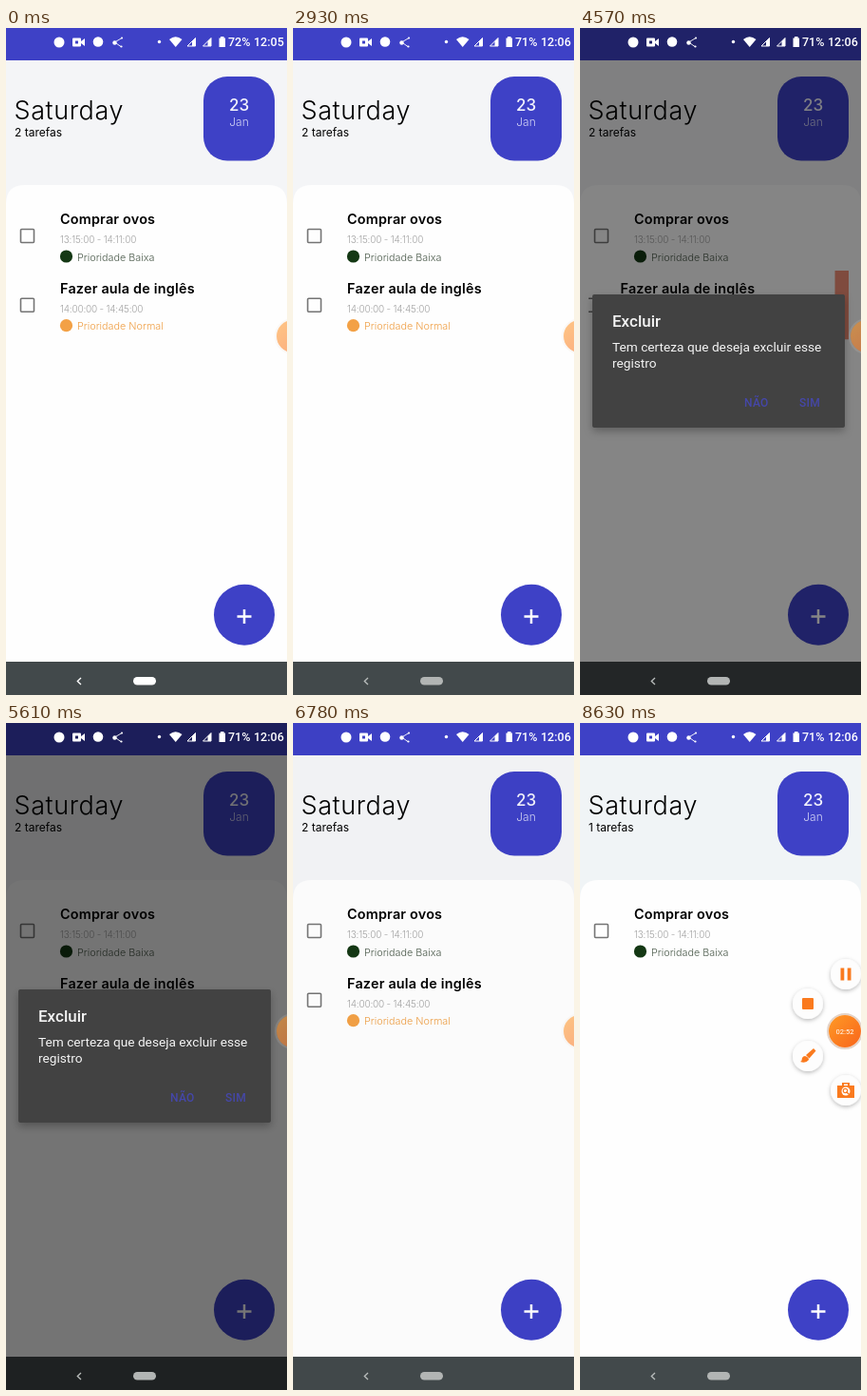
An HTML page for the animation above (8.78 s loop, 296x701 px).

```html
<!DOCTYPE html>
<html lang="pt">
<head>
<meta charset="utf-8">
<title>Tarefas</title>
<style>
  html, body { margin: 0; width: 100%; height: 100%; overflow: hidden; background: #fff; }
  svg { display: block; width: 100vw; height: 100vh; }
  text { font-family: Inter, "Open Sans", sans-serif; }
  .sys text, text.sys { font-family: Roboto, sans-serif; font-weight: 500; }
  .day { font-size: 27px; font-weight: 300; letter-spacing: .6px; }
  .title { font-size: 14.4px; font-weight: 600; letter-spacing: .2px; }
  .hours { font-size: 10px; font-weight: 300; fill: #a2a2a2; letter-spacing: -.2px; }
  .priority { font-size: 10.8px; font-weight: 300; }
  .mid { text-anchor: middle; }
  .menu path, .menu rect { fill: #fa7a1e; }
</style>
</head>
<body>
<svg viewBox="0 0 296 701" preserveAspectRatio="none">
  <defs>
    <clipPath id="rowClip"><rect x="9" y="255" width="274" height="72.5"/></clipPath>
    <filter id="soft" x="-30%" y="-30%" width="160%" height="170%">
      <feDropShadow dx="0" dy="1.5" stdDeviation="2" flood-opacity=".28"/>
    </filter>
    <filter id="lift" x="-10%" y="-10%" width="120%" height="130%">
      <feDropShadow dx="0" dy="4" stdDeviation="4.5" flood-opacity=".27"/>
    </filter>
    <linearGradient id="amber" x2="1" y2="1">
      <stop stop-color="#ff9a25"/><stop offset="1" stop-color="#f8651c"/>
    </linearGradient>
  </defs>

  <rect id="header" width="296" height="200" fill="#f4f5f7"/>
  <rect width="296" height="34" fill="#3e41c6"/>
  <path d="M0 667V185Q0 165 20 165H276Q296 165 296 185V667Z" fill="#fefefe"/>

  <text class="day" x="8.5" y="95.5">Saturday</text>
  <text id="count" x="9" y="113.5" font-size="12"></text>
  <rect x="208" y="51" width="75" height="88.5" rx="25" fill="#3e41c6"/>
  <text class="mid" x="245.5" y="87" font-size="17" font-weight="500" fill="#f2f2fc">23</text>
  <text class="mid" x="245.5" y="103" font-size="12" font-weight="300" fill="#d0d1f4">Jan</text>

  <g id="first"></g>
  <g id="swipe" clip-path="url(#rowClip)">
    <g id="second"></g>
    <g id="remove">
      <rect x="283" y="255" width="86" height="72.5" fill="#ee6b4a"/>
      <text class="sys mid" x="326.5" y="297.5" font-size="12" fill="#fbe3dc">EXCLUIR</text>
    </g>
  </g>

  <circle cx="251" cy="616.7" r="32" fill="#3e41c6"/>
  <path d="M243.5 618.5H258.5M251 611V626" stroke="#fff" stroke-width="2.5"/>

  <rect y="666" width="296" height="35" fill="#42494b"/>
  <rect id="dim" width="296" height="701"/>
  <path id="back" d="M79 683L75.3 686.5L79 690" fill="none" stroke-width="1.3"/>
  <rect id="home" x="134" y="682" width="24" height="8.5" rx="4.25"/>

  <g class="sys" fill="#fff">
    <circle cx="56" cy="15" r="5.5"/>
    <path d="M71 10.500H78Q79 10.500 79 11.500V14L83 11V19L79 16V18.500Q79 19.500 78 19.500H71Q70 19.500 70 18.500V11.500Q70 10.500 71 10.500ZM73 13.500V16.500H76V13.500Z" fill-rule="evenodd"/>
    <circle cx="97" cy="14.5" r="5.3"/>
    <path d="M122 10.5L114.5 15L121 19.5" fill="none" stroke="#fff" stroke-width=".9"/>
    <circle cx="114.5" cy="15.5" r="2.2"/>
    <circle cx="122" cy="10.5" r="1.1"/>
    <circle cx="121.5" cy="19.5" r="1.1"/>
    <circle cx="161.5" cy="14.5" r="1.7"/>
    <path d="M172 12Q178.5 6.500 185.5 12L178.7 20Z"/>
    <path d="M191 19L199.500 10.500V19ZM207.500 19L216 10.500V19Z" fill="none" stroke="#fff"/>
    <path d="M196 14V19H199.500V10.500ZM212.500 14V19H216V10.500Z"/>
    <path d="M224.5 10.500H226V9H229.5V10.500H231V20H224.5Z"/>
    <text id="battery" x="234" y="19" font-size="12.5"></text>
    <text id="clock" x="261" y="19" font-size="12.5"></text>
  </g>

  <g class="sys">
    <rect id="panel" x="13" y="280" width="266" height="140" rx="2" fill="#424242" filter="url(#lift)"/>
    <g id="message" fill="#f4f4f4">
      <text x="34" y="314" font-size="17">Excluir</text>
      <g font-size="13.7">
        <text x="34" y="340" style="font-weight:400">Tem certeza que deseja excluir esse</text>
        <text x="34" y="356.5" style="font-weight:400">registro</text>
      </g>
    </g>
    <g id="buttons" font-size="12" letter-spacing=".3" fill="#4547a8">
      <rect id="press" x="217" y="375" width="48" height="36.5" rx="2" fill="#6d6d6d"/>
      <text x="173" y="398">NÃO</text>
      <text x="231" y="398">SIM</text>
    </g>
  </g>

  <g id="menu" class="menu"></g>
  <g id="bubble">
    <circle r="18" fill="none" stroke="#e3d3c8" stroke-width="2" id="ring"/>
    <circle r="17" fill="url(#amber)" id="ball"/>
    <text id="timer" class="sys mid" y="2.7" font-size="7.5" fill="#ffe9d6">02:52</text>
  </g>
</svg>

<script>
const LOOP = 8780;
const $ = id => document.getElementById(id);
const set = (id, attrs) => {
  for (const key in attrs) $(id).setAttribute(key, attrs[key]);
};
const clamp = v => Math.max(0, Math.min(1, v));
const ease = v => v * v * (3 - 2 * v);
const ramp = (t, from, to) => ease(clamp((t - from) / (to - from)));
const within = (t, from, to) => t >= from && t < to;

function task(y, title, hours, priority, dot, ink) {
  return `<rect x="15.5" y="${y + 10.5}" width="14" height="14" rx="1" fill="none" stroke="#747474" stroke-width="1.6"/>
    <text class="title" x="57" y="${y + 5}">${title}</text>
    <text class="hours" x="57" y="${y + 25}">${hours}</text>
    <circle cx="63.5" cy="${y + 39}" r="6.6" fill="${dot}"/>
    <text class="priority" x="75" y="${y + 43.5}" fill="${ink}">Prioridade ${priority}</text>`;
}
$('first').innerHTML = task(201, 'Comprar ovos', '13:15:00 - 14:11:00', 'Baixa', '#143814', '#4d5c4d');
$('second').innerHTML = task(273.7, 'Fazer aula de inglês', '14:00:00 - 14:45:00', 'Normal', '#f3a146', '#ef9f45');

// Tools that fan out from the recorder bubble
const tools = [
  [280, 264, '<path d="M-5.5-6.5H-1.7V6.5H-5.5ZM1.7-6.5H5.5V6.5H1.7Z"/>'],
  [240, 295, '<rect x="-6" y="-6" width="12" height="12" rx="1"/>'],
  [240, 350, '<path d="M-2-1L6-8L8.5-5.5L1.5 2.5ZM-3 0Q1 1 1 4Q-2 8-8 6Q-6 5-6 2Q-5 0-3 0Z"/>'],
  [280, 386, `<path d="M-9-5H-4V-8H4V-5H9V8H-9ZM-2-6.5V-5H2V-6.5Z" fill-rule="evenodd"/>
    <circle cy="1" r="4.5" fill="#fff"/>
    <circle cx="-.5" cy=".5" r="2.2" fill="none" stroke="#fa7a1e" stroke-width="1.2"/>
    <path d="M1 1L4 4L3 5L0 2Z"/>`]
];
$('menu').innerHTML = tools.map(([, , icon]) =>
  `<g><circle r="16" fill="#fdfdfd" filter="url(#soft)"/>${icon}</g>`).join('');
const toolNodes = [...$('menu').children];

function draw(t) {
  const late = t >= 2900;
  const deleted = t >= 6800;
  $('battery').textContent = late ? '71%' : '72%';
  $('clock').textContent = late ? '12:06' : '12:05';
  $('count').textContent = deleted ? '1 tarefas' : '2 tarefas';
  set('header', { fill: deleted ? '#f0f4f6' : '#f4f5f7' });
  set('home', { fill: t < 450 ? '#fff' : late ? '#b2b5b4' : '#d9deda' });
  set('back', { stroke: t < 450 ? '#fff' : late ? '#b9bdbc' : '#ced3d2' });

  // Swipe open, then slide shut behind the dialog
  const shut = clamp((t - 4255) / 380);
  const shift = -86 * ramp(t, 3750, 4150) * (1 - shut);
  const move = `translate(${shift} 0)`;
  set('second', { transform: move });
  set('remove', { transform: move, opacity: 1 - .3 * shut });
  set('swipe', { visibility: deleted ? 'hidden' : 'visible' });

  const close = ramp(t, 6560, 6760);
  const dim = (.48 * ramp(t, 4270, 4500) + .06 * ramp(t, 4580, 4800)) * (1 - ramp(t, 6600, 6800));
  const shown = within(t, 4230, 6760);
  set('dim', { opacity: dim });
  set('panel', { opacity: shown ? ramp(t, 4230, 4410) * (1 - close) : 0 });
  set('message', { opacity: shown ? 1 - close : 0 });
  set('buttons', { opacity: ramp(t, 4280, 4430) * (1 - close) });
  set('press', { opacity: within(t, 6480, 6760) ? 1 : 0 });

  const wake = ramp(t, 8380, 8500);
  const open = ramp(t, 8440, 8590);
  const x = 302 - 23 * wake;
  set('bubble', { transform: `translate(${x} 324)` });
  set('ball', { opacity: .56 + .44 * wake });
  set('ring', { opacity: .15 + .85 * wake });
  set('timer', { opacity: wake });
  set('menu', { opacity: open });
  toolNodes.forEach((node, i) => {
    const [tx, ty] = tools[i];
    node.setAttribute('transform',
      `translate(${x + (tx - x) * open} ${324 + (ty - 324) * open}) scale(${.4 + .6 * open})`);
  });
}

const start = performance.now();
function tick() {
  draw((performance.now() - start) % LOOP);
  requestAnimationFrame(tick);
}
tick();
</script>
</body>
</html>
```
